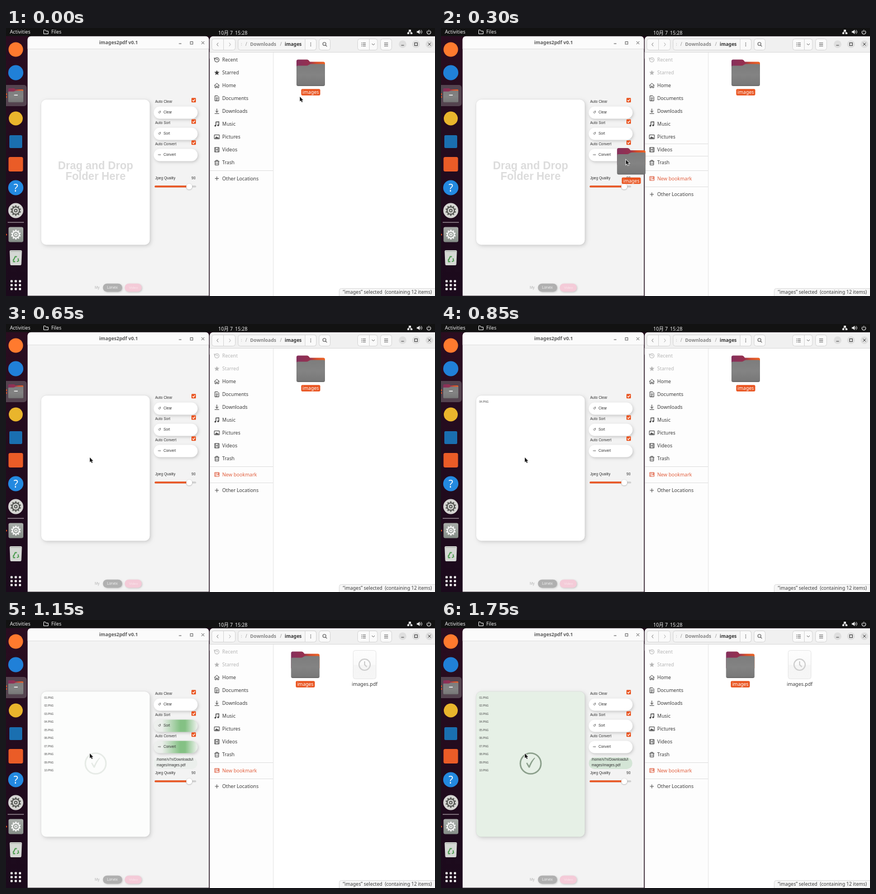
An HTML page with a canvas that plays this animation: 768x480 px, repeating every 1800 ms.

```html
<!DOCTYPE html>
<html lang="en">
<head>
<meta charset="utf-8">
<title>images2pdf</title>
<style>
html, body { margin: 0; width: 100%; height: 100%; overflow: hidden; background: #1f0b1a; }
canvas { display: block; width: 768px; height: 480px; }
</style>
</head>
<body>
<canvas id="stage" width="768" height="480"></canvas>
<script>
const ctx = document.getElementById('stage').getContext('2d');
const LOOP = 1800, STEP = 50;
const UI = '"Noto Sans", "Noto Sans CJK SC", "Noto Sans CJK JP", sans-serif';
const APP = '"Liberation Sans", Arial, sans-serif';
const ORANGE = '#e95420', INK = '#3d3d3d';

const clamp = v => Math.max(0, Math.min(1, v));
const ramp = (t, a, b) => clamp((t - a) / (b - a));
const mix = (a, b, k) => `rgb(${a.map((v, i) => Math.round(v + (b[i] - v) * k))})`;

function text(s, x, y, size, color, o = {}) {
  ctx.font = `${o.weight || 400} ${size}px ${o.font || UI}`;
  ctx.textAlign = o.align || 'left';
  ctx.fillStyle = color;
  ctx.fillText(s, x, y);
}
const appText = (s, x, y, size, color, o) => text(s, x, y, size, color, { font: APP, ...o });

function rect(x, y, w, h, color) {
  ctx.fillStyle = color;
  ctx.fillRect(x, y, w, h);
}
function box(x, y, w, h, r, fill, stroke) {
  ctx.beginPath();
  ctx.roundRect(x, y, w, h, r);
  if (fill) { ctx.fillStyle = fill; ctx.fill(); }
  if (stroke) { ctx.strokeStyle = stroke; ctx.lineWidth = 1; ctx.stroke(); }
}
function disc(x, y, r, color) {
  ctx.beginPath();
  ctx.arc(x, y, r, 0, 7);
  ctx.fillStyle = color;
  ctx.fill();
}
function ring(x, y, r, color, w = 1) {
  ctx.beginPath();
  ctx.arc(x, y, r, 0, 7);
  ctx.strokeStyle = color;
  ctx.lineWidth = w;
  ctx.stroke();
}
// Strokes or fills an SVG path placed at x, y.
function path(d, x, y, color, w = 1, fill = false) {
  ctx.save();
  ctx.translate(x, y);
  const p = new Path2D(d);
  if (fill) { ctx.fillStyle = color; ctx.fill(p); }
  else { ctx.strokeStyle = color; ctx.lineWidth = w; ctx.stroke(p); }
  ctx.restore();
}
function shadowed(blur, dx, dy, color, draw) {
  ctx.save();
  ctx.shadowBlur = blur;
  ctx.shadowOffsetX = dx;
  ctx.shadowOffsetY = dy;
  ctx.shadowColor = color;
  draw();
  ctx.restore();
}
function blend(x0, y0, x1, y1, ...stops) {
  const g = ctx.createLinearGradient(x0, y0, x1, y1);
  stops.forEach(([at, color]) => g.addColorStop(clamp(at), color));
  return g;
}

function folder(x, y, k = 1) {
  ctx.save();
  ctx.translate(x, y);
  ctx.scale(k, k);
  const back = blend(0, 0, 51, 0, [0, '#85305c'], [.45, '#96304f'], [.7, '#d64e2a'], [1, '#ee6424']);
  path('M0 3Q0 0 3 0H19Q21 0 22 1.5L24 4H48Q51 4 51 7V30H0Z', 0, 0, back, 1, true);
  const front = blend(0, 8, 0, 47.5, [0, '#7d7d7d'], [.5, '#838383'], [.93, '#797979'], [1, '#666']);
  path('M0 13Q0 11 2 11H18Q20 11 22 9.5Q24 8 26 8H49Q51 8 51 10V44.5Q51 47.5 48 47.5H3Q0 47.5 0 44.5Z', 0, 0, front, 1, true);
  ctx.restore();
}
function folderItem(cx, top) {
  folder(cx - 25.5, top);
  box(cx - 17, top + 52.8, 34, 11.5, 2, ORANGE);
  text('images', cx, top + 61.7, 8.6, '#fff', { align: 'center' });
}
function gear(x, y, r, color, hole) {
  for (let i = 0; i < 10; i++) {
    ctx.save();
    ctx.translate(x, y);
    ctx.rotate(i * Math.PI / 5);
    rect(-1.2, -r - 1.8, 2.4, 3, color);
    ctx.restore();
  }
  ring(x, y, r - 1, color, 2);
  disc(x, y, r * .42, color);
  disc(x, y, r * .2, hole);
}

function topBar() {
  rect(0, 0, 768, 14.5, '#121212');
  const w = { weight: 500 };
  text('Activities', 7, 10, 8.8, '#f0f0f0', w);
  path('M.5 1.5V7.5H8.5V2.5H4.5L3.5 .5H.5Z', 67, 3, '#eee');
  text('Files', 81, 10, 8.7, '#f0f0f0', w);
  text('10月 7', 380, 12, 8.7, '#f0f0f0', w);
  text('15:28', 410, 12, 8.7, '#f0f0f0', w);
  rect(721, 3, 4, 3, '#eee');
  rect(718.5, 8, 3.5, 3, '#eee');
  rect(724, 8, 3.5, 3, '#eee');
  path('M5 3V4.5M2 6V4.5H7.5V6', 718, 2.5, '#eee');
  path('M0 2.5H2L5 0V8L2 5.5H0Z', 735.5, 3, '#eee', 1, true);
  path('M0 1.5Q2 3.5 0 5.5M1.5 0Q5 3.5 1.5 7', 741.5, 3.5, '#ddd');
  path('M-2 -2.4A3.4 3.4 0 1 0 2 -2.4M0 -4V0', 757, 7.3, '#eee', 1.1);
}

function dock() {
  rect(0, 14, 39, 466, blend(0, 15, 0, 480, [0, '#2a0d20'], [1, '#1b0a1c']));
  disc(17.5, 38.5, 13, '#ff7a2e');
  disc(17.5, 80, 13.5, '#2080d8');
  box(-4, 102, 41, 38, 5, '#54434f');
  disc(.3, 118.5, 1.5, ORANGE);
  disc(.3, 123.5, 1.5, ORANGE);
  folder(4, 108, .53);
  rect(14.5, 119.5, 6.5, 1.5, '#f4f4f4');
  disc(17.5, 162, 12.5, '#e9b52c');
  box(6, 192, 23, 23, 2, '#1a6fb0');
  box(4.5, 231, 26, 26, 3, '#ea5c27');
  disc(17.5, 286, 13.6, '#2389e0');
  text('?', 17.5, 292.7, 19, '#fff', { align: 'center', weight: 500 });
  disc(17.5, 327, 13.4, '#d6d6d3');
  gear(17.5, 327, 7.6, '#555753', '#d6d6d3');
  rect(3, 347.6, 29, 1, '#c5bcc2');
  disc(.3, 370, 1.5, ORANGE);
  box(4.5, 356.5, 26.5, 27, 3, blend(0, 357, 0, 383, [0, '#a9aeaa'], [1, '#868e88']));
  gear(17.7, 370, 7, '#f5f5f5', '#989e99');
  path('M0 2Q0 0 2 0H20Q22 0 22 2L21 25Q21 27 19 27H3Q1 27 1 25Z', 6.5, 398, '#d5d8d4', 1, true);
  rect(8, 399.3, 19, 1.5, '#b4b8b3');
  path('M-4 2L-1 -4H2M4 -1L5 3.5L2 5M-1 5H-4L-4.5 1', 17.5, 413.5, '#4a9a4d', 1.8);
  for (let i = 0; i < 9; i++) box(8 + i % 3 * 7.5, 451.5 + Math.floor(i / 3) * 7, 4, 4, 1, '#f3f1f2');
}

function pill(y, icon, label, sweep) {
  let fill = '#fff';
  if (sweep >= 0 && sweep < 1) {
    const head = sweep * 1.8, grey = mix([236, 237, 236], [255, 255, 255], ramp(sweep, .7, 1));
    if (head < 1) fill = blend(265, 0, 343, 0, [0, '#eef0ee'], [head - .5, '#eaeeea'], [head - .08, '#84c184'], [head + .03, '#84c184'], [head + .3, '#e9efe9'], [1, '#f2f4f2']);
    else fill = blend(265, 0, 343, 0, [0, '#f3f3f3'], [.86, '#f1f2f1'], [.93, grey], [1, grey]);
  }
  shadowed(5, 1.5, 2, 'rgba(0,0,0,.18)', () => box(264.5, y, 78.5, 22, 11, fill));
  text(icon, 272, y + 12.6, 6.5, '#333', { font: '"DejaVu Sans", sans-serif' });
  appText(label, 282, y + 12.3, 6.3, '#333');
}
function option(y, label) {
  appText(label, 267, y + 4.8, 6.5, '#333');
  box(332, y - 4, 8, 8, 1.2, ORANGE);
  path('M1.8 4L3.5 5.8L6.4 2.4', 332, y - 4, '#fff', 1.3);
}

function fileRows(t) {
  const order = [4, 9, 1, 7, 10, 3, 6, 2, 8, 5];
  if (t < 850) return [];
  if (t >= 1100) return order.map((_, i) => i + 1);
  return order.slice(0, 1 + Math.floor((t - 850) / 22));
}

function converter(t) {
  const done = t >= 1100;
  box(38.7, 14.7, 324.5, 464.8, [6, 6, 0, 0], '#f3f3f3');
  box(38.7, 14.7, 324.5, 22.8, [6, 6, 0, 0], '#fbfbfb');
  rect(39, 37, 324, 1, '#dfdfdf');
  text('images2pdf v0.1', 201.5, 29.2, 8.6, '#5c5c5c', { weight: 700, align: 'center' });
  rect(309.5, 27.5, 4.5, 1, '#555');
  ctx.strokeStyle = '#666';
  ctx.lineWidth = 1;
  ctx.strokeRect(330, 24.5, 4.5, 4.5);
  path('M0 0L5 5M5 0L0 5', 350, 24, '#555');

  const green = Math.pow(ramp(t, 1100, 1750), .8);
  const fill = mix([255, 255, 255], [230, 240, 230], green);
  shadowed(6, 2, 2, 'rgba(0,0,0,.16)', () => box(63, 128, 194.5, 260.5, 9, fill));
  box(62.8, 128, 195, 260.5, 9, null, 'rgba(0,0,0,.045)');

  if (t < 600) {
    const o = { weight: 700, align: 'center' };
    appText('Drag and Drop', 160.3, 253, 19.4, '#dcdcdc', o);
    appText('Folder Here', 160.3, 272.4, 19.4, '#dcdcdc', o);
  }
  fileRows(t).forEach((n, i) =>
    appText(String(n).padStart(2, '0') + '.PNG', 68.5, 140.8 + i * 14.5, 4.7, '#444'));
  if (done) {
    ctx.globalAlpha = ramp(t, 1000, 1750);
    ring(160.5, 257, 18.5, '#8b9f8b', 2.6);
    path('M-8 0L-6.3 -1.2L-2.8 4.2Q1 -5 7 -10L8 -9.3Q2 -2 -1.6 8H-3.6Z', 160.5, 256.5, '#8b9f8b', 1, true);
    ctx.globalAlpha = 1;
  }

  const sweep = t < 1050 ? -1 : t < 1300 ? (t - 1050) / 250 * .95 : .75 + ramp(t, 1300, 1600) * .25;
  option(129.2, 'Auto Clear');
  pill(140.5, '↺', 'Clear', -1);
  option(167.6, 'Auto Sort');
  pill(178.5, '↺', 'Sort', sweep);
  option(205.3, 'Auto Convert');
  pill(216.5, '⇨', 'Convert', sweep);

  if (done) {
    box(264.5, 246, 78, 21, 10, mix([240, 241, 240], [212, 229, 214], Math.pow(ramp(t, 1100, 1750), .7)));
    appText('/home/v7n/Downloads/i', 269.5, 252.3, 6.35, '#333');
    appText('mages/images.pdf', 269.5, 261.8, 6.35, '#333');
  }
  const y = done ? 5 : 0;
  appText('Jpeg Quality', 267, 271 + y, 6.5, '#333');
  appText('90', 339.3, 271 + y, 6.5, '#333', { align: 'right' });
  box(266, 282.3 + y, 74.5, 3.2, 1.6, '#cfcfcf');
  box(266, 282.3 + y, 62, 3.2, 1.6, ORANGE);
  shadowed(2, 0, .5, 'rgba(0,0,0,.35)', () => disc(328, 284 + y, 5.3, '#fff'));

  appText('My', 159, 467, 6.3, '#b4b4b4');
  shadowed(3, 1, 1, 'rgba(0,0,0,.18)', () => {
    box(173.5, 457.7, 34.5, 14.8, 7.4, '#b0b0b0');
    box(212.5, 457.7, 30.5, 14.8, 7.4, '#f4cbd8');
  });
  appText('Lorvex', 190.5, 467, 6.3, '#f1f1f1', { align: 'center' });
  appText('Video', 228, 467, 6.2, '#fae6ec', { align: 'center' });
}

const places = [
  ['Recent', (x, y, c) => { ring(x, y, 4, c); path('M0 -2.5V0H2M-4.5 -4V-1.5H-2', x, y, c); }],
  ['Starred', (x, y, c) => path('M0 -4.6L1.3 -1.4L4.6 -1.2L2 1L2.9 4.3L0 2.4L-2.9 4.3L-2 1L-4.6 -1.2L-1.3 -1.4Z', x, y, c, 1, true)],
  ['Home', (x, y, c) => path('M-4.5 0L0 -4L4.5 0M-3.3 -1V4H-1V1H1V4H3.3V-1', x, y, c)],
  ['Documents', (x, y, c) => path('M-3.5 -4.5H1.5L3.5 -2.5V4.5H-3.5ZM-1.8 -1H1.8M-1.8 1H1.8M-1.8 3H1', x, y, c)],
  ['Downloads', (x, y, c) => path('M0 -4.5V2M-2.8 -.7L0 2L2.8 -.7M-4 4.2H4', x, y, c)],
  ['Music', (x, y, c) => { path('M-1.7 3V-3.7L3.5 -4.2V2', x, y, c, 1.2); disc(x - 2.8, y + 3, 1.5, c); disc(x + 2.3, y + 2.2, 1.5, c); }],
  ['Pictures', (x, y, c) => { path('M-4.5 -3.5H4.5V3.5H-4.5Z', x, y, c); path('M-3.5 2.5L-1 -1L.8 1L2 0L3.5 2.5Z', x, y, c, 1, true); }],
  ['Videos', (x, y, c) => path('M-4 -4H4V4H-4ZM-2 -4V4M2 -4V4M-2 0H2', x, y, c)],
  ['Trash', (x, y, c) => path('M-4.3 -2.2H4.3M-1.8 -2.2V-4H1.8V-2.2M-3.2 -2V4.3H3.2V-2M-1.3 0V2.5M1.3 0V2.5', x, y, c)],
];

function headerBar() {
  const edge = '#d6d6d6', face = '#fafafa', ink = '#606060';
  box(364.6, 14.7, 404, 40, [6, 0, 0, 0], '#f0f0f0');
  box(368.5, 19.5, 42, 20, 4, face, edge);
  rect(389, 20, 1, 19, edge);
  path('M2.5 0L0 3L2.5 6', 377.5, 26.5, '#777');
  path('M0 0L2.5 3L0 6', 399.5, 26.5, '#aaa');
  box(415.5, 19.5, 140, 20, 4, '#f6f6f6', edge);
  box(535.5, 19.5, 20, 20, [0, 4, 4, 0], face, edge);
  rect(421, 27, 1, 1.5, '#ccc');
  rect(421, 30, 1, 1.5, '#ccc');
  text('/', 428.5, 32, 8.6, '#999');
  text('Downloads', 437, 32, 8.5, '#858585', { weight: 700 });
  text('/', 490.5, 32, 8.6, '#999');
  text('images', 499, 32, 8.4, '#333', { weight: 700 });
  for (let i = -1; i < 2; i++) disc(545.5, 29.3 + i * 2.6, .8, ink);
  box(560.5, 19.5, 20, 20, 4, face, edge);
  ring(570, 28.5, 2.8, ink, 1.1);
  path('M0 0L2.5 2.5', 572, 30.7, ink, 1.2);
  box(629.5, 19.5, 35.5, 20, 4, face, edge);
  rect(650, 20, 1, 19, edge);
  path('M0 0L2.5 2.5L5 0', 655, 28, ink);
  box(670.5, 19.5, 20, 20, 4, face, edge);
  for (let i = -1; i < 2; i++) {
    const y = 29 + i * 2.7;
    rect(636, y, 1.5, 1, ink);
    rect(638.5, y, 5.5, 1, ink);
    rect(677, y, 7, 1, ink);
  }
  [710, 734, 758].forEach(x => disc(x, 29, 6.8, '#dedede'));
  rect(707.5, 30.5, 5, 1, '#444');
  ctx.strokeStyle = '#444';
  ctx.lineWidth = 1;
  ctx.strokeRect(731.5, 26.5, 5, 5);
  path('M0 0L5 5M5 0L0 5', 755.5, 26.5, '#444');
}

function fileManager(t) {
  const dragged = t >= 150;
  headerBar();
  rect(364.6, 43, 113.4, 437, '#fdfdfd');
  rect(478, 43, 290, 437, '#fff');
  rect(365, 43, 403, 1, '#dcdcdc');
  rect(478, 44, 1, 436, '#e6e6e6');
  places.forEach(([name, icon], i) => {
    const y = 57 + i * 23, c = dragged && i < 2 ? '#b5b5b5' : INK;
    icon(377.5, y, c);
    text(name, 387, y + 3.2, 8.7, c);
  });
  rect(365, 255, 113, 1, '#e0e0e0');
  if (t >= 250 && t < 350) {
    rect(365, 207, 113, 1, '#e0e0e0');
    rect(365, 229, 113, 1, '#e0e0e0');
  }
  let y = 269.5;
  if (dragged) {
    path('M-4 -3.5H4V3.5H-4ZM-2 -3.5V3.5M.5 -3.5V1L1.8 0L3 1V-3.5', 377.5, y, '#e0664a');
    text('New bookmark', 387, y + 3, 8.7, '#e2603f');
    rect(365, 284, 113, 1, '#e0e0e0');
    y += 28.5;
  }
  path('M-3.5 0H3.5M0 -3.5V3.5', 377.5, y, '#555');
  text('Other Locations', 387, y + 3, 8.7, INK);

  if (t < 1100) folderItem(545.5, 56.5);
  else {
    folderItem(535.8, 56.5);
    box(621.5, 54.5, 41, 51, 4, blend(0, 54, 0, 106, [0, '#fdfdfd'], [.5, '#fafafa'], [.52, '#f5f5f5'], [1, '#f6f6f6']), '#e6e6e6');
    ring(642, 80, 10, '#cecece', 2);
    path('M0 -6V0L4 4', 642, 80, '#cecece', 2);
    text('images.pdf', 642, 118, 8.8, INK, { align: 'center' });
  }
  box(596.5, 466.5, 176, 18, [4, 0, 0, 0], '#f6f6f6', '#dcdcdc');
  text('“images” selected  (containing 12 items)', 603, 476.4, 8.55, INK);
}

// time, x, y
const route = [[0, 526, 123], [100, 543, 77], [150, 543, 77], [270, 383, 236], [300, 331, 236], [450, 150, 239]];
function pointer(t) {
  const i = route.findIndex(k => k[0] > t);
  if (i < 0) return route[route.length - 1].slice(1);
  const a = route[i - 1] || route[0], b = route[i], k = ramp(t, a[0], b[0]);
  return [a[1] + (b[1] - a[1]) * k, a[2] + (b[2] - a[2]) * k];
}

function draw(t) {
  rect(0, 0, 768, 480, '#1f0b1a');
  dock();
  converter(t);
  fileManager(t);
  topBar();
  if (t >= 150 && t < 600) {
    const [x, y] = pointer(t - 7); // the dragged icon trails the pointer
    folderItem(x - 2.5, y - 21);
  }
  const [x, y] = pointer(t);
  const arrow = 'M0 0V8.6L2 6.8L3.5 10L5 9.3L3.6 6.2H6.2Z';
  path(arrow, x, y, '#fff', 1.4);
  path(arrow, x, y, '#1a1a1a', 1, true);
}

const start = performance.now();
function frame() {
  const t = (performance.now() - start) % LOOP;
  draw(Math.floor(t / STEP) * STEP);
  requestAnimationFrame(frame);
}
frame();
</script>
</body>
</html>
```
